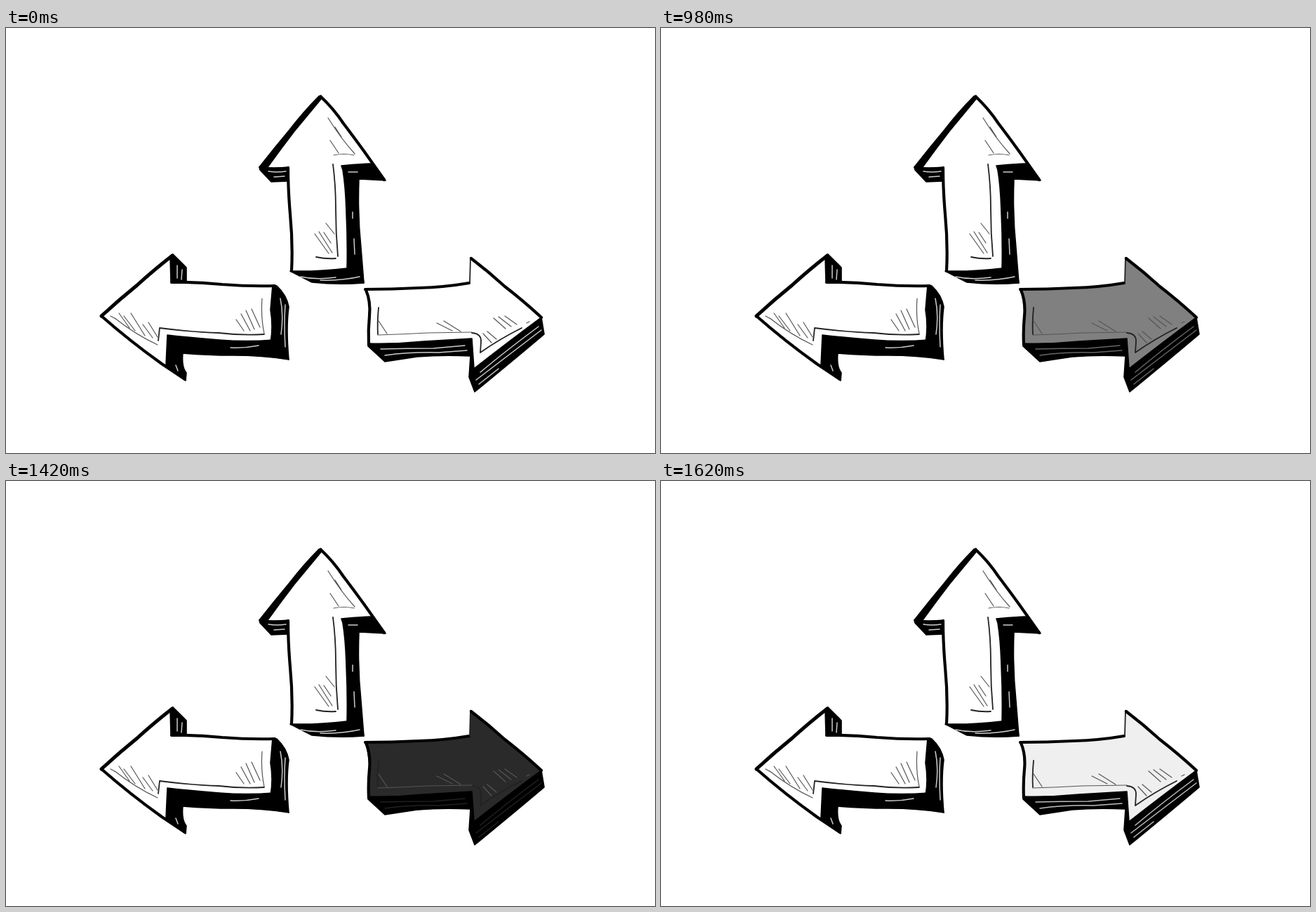
These frames come from a looping animation (925 px wide and 605 px high, 2400 ms). An HTML page:

```html
<!DOCTYPE html>
<html lang="en">
<head>
<meta charset="utf-8">
<title>Three arrows</title>
<style>
  html, body { margin: 0; width: 100%; height: 100%; overflow: hidden; background: #fff; }
  svg { display: block; width: 925px; height: 605px; }
  g { color: #fff; }
  path { fill: none; stroke: #000; stroke-linecap: round; stroke-linejoin: round; }
  .face { fill: currentColor; stroke: none; }
  .ink { fill: #000; stroke-width: 1.6; }
  .edge { stroke-width: 4.2; }
  .bold { stroke-width: 5; }
  .line { stroke: #222; stroke-width: 1.8; }
  .hatch { stroke: #555; stroke-width: 1.2; }
  .gap { stroke: currentColor; stroke-width: 1.5; opacity: .8; }
</style>
</head>
<body>
<svg viewBox="0 0 925 605">
  <g id="up">
    <path class="ink" d="M449 96L446 97Q424 119 404 145Q383 170 361 198L365 203L373 198Q391 173 411 147L450 100Z"/>
    <path class="edge" d="M449 98Q467 115 481 136Q494 153 510 175L539 216"/>
    <path class="ink" d="M361 198Q382 200 403 198L402 218L378 219L362 202Z"/>
    <path class="edge" d="M402 199Q402 230 405 265Q409 307 407 346"/>
    <path class="ink" d="M478 196Q498 194 519 193L526 197L541 217L503 215Q501 265 506 313L510 363L486 344Q487 306 485 263Q484 226 480 202Z"/>
    <path class="ink" d="M405 346Q446 347 486 342L507 347L510 363Q474 366 436 362Z"/>
    <path class="line" d="M466 194Q470 225 470 258Q470 292 473 325M442 326Q456 329 470 328"/>
    <path class="hatch" d="M459 128Q477 157 497 179M469 141L478 155M462 160L474 178M467 181Q482 178 496 181"/>
    <path class="hatch" d="M440 293L460 321M446 290L465 320M453 291L463 306M456 278L468 293"/>
    <path class="gap" d="M374 204Q386 206 399 204M382 212L397 211M488 205L501 205M494 262L494 271M496 300L497 322M420 354Q442 359 470 355M448 359Q478 360 504 354"/>
  </g>

  <g id="left">
    <path class="edge bold" d="M237 324Q210 345 187 366Q161 387 136 410"/>
    <path class="edge" d="M136 410Q177 446 222 478L255 500"/>
    <path class="ink" d="M234 325L238 322L257 341L257 362L235 362Z"/>
    <path class="edge" d="M236 362Q271 361 308 365Q346 368 383 367"/>
    <path class="ink" d="M380 366L386 367Q400 380 403 397Q399 427 403 472L377 448Q381 425 377 401Z"/>
    <path class="ink" d="M230 437Q264 441 304 444Q343 447 381 444L403 472Q364 466 324 466Q286 466 252 463Q250 482 257 491L256 502L228 480Z"/>
    <path class="line" d="M217 445L219 427Q266 433 303 434Q336 438 368 436"/>
    <path class="hatch" d="M365 385Q363 411 368 435M149 410L158 415M161 406L176 427M168 410L184 431M178 406L198 438M195 422L209 441M203 419L216 440M155 413Q184 436 216 451"/>
    <path class="hatch" d="M328 415L339 431M335 407L348 431M342 402L354 429M350 400L362 426"/>
    <path class="gap" d="M244 338L244 356M251 344L250 358M391 385Q396 408 392 436M398 394Q396 421 398 454M320 455Q340 456 360 452M242 480L245 488"/>
  </g>

  <g id="right">
    <path class="face" d="M512 372Q588 374 661 363L662 327L763 412L767 436L668 518L660 497L662 467Q600 464 540 475L517 453Q521 411 512 372Z"/>
    <path class="edge" d="M512 372Q550 372 588 370Q625 369 660 363"/>
    <path class="edge" d="M513 373Q520 389 518 410Q516 430 517 451"/>
    <path class="line" d="M662 327L661 363"/>
    <path class="edge" d="M663 328Q688 347 711 368Q737 388 763 412"/>
    <path class="ink" d="M516 449Q556 450 596 446Q632 444 664 442L667 485Q713 449 763 412L767 436Q716 479 668 518L660 497L662 467Q622 465 586 468L540 475L516 453Z"/>
    <path class="line" d="M531 398Q529 420 530 436M664 434Q678 435 677 447L676 462Q703 443 735 427"/>
    <path class="hatch" d="M530 437Q565 436 601 434L664 433M531 417L543 435M614 420L636 431M624 417L648 432"/>
    <path class="hatch" d="M695 413L712 428M702 411L720 425M711 410L728 422M680 435L692 448M686 432L699 443M742 420L746 418"/>
    <path class="gap" d="M534 457Q571 456 609 456L654 452M540 466Q577 461 616 462L657 459M676 490Q713 459 759 425M670 501Q713 468 763 430M674 507L702 485"/>
  </g>
</svg>
<script>
const LOOP = 2400, STEP = 20;
const arrow = document.getElementById('right');
// [time in ms, grey level]; equal times make a hard change
const keys = [
  [0, 255], [880, 255], [880, 226], [900, 226], [920, 202], [980, 128], [1100, 17],
  [1400, 17], [1420, 42], [1500, 128], [1620, 239], [LOOP, 239]
];

function greyAt(time) {
  const i = keys.findIndex(key => key[0] > time);
  const [t0, v0] = keys[i - 1], [t1, v1] = keys[i];
  return Math.round(v0 + (v1 - v0) * (time - t0) / (t1 - t0));
}

function draw() {
  const time = performance.now() % LOOP;
  const grey = greyAt(Math.floor(time / STEP) * STEP);
  arrow.style.color = `rgb(${grey}, ${grey}, ${grey})`;
  requestAnimationFrame(draw);
}
draw();
</script>
</body>
</html>
```
